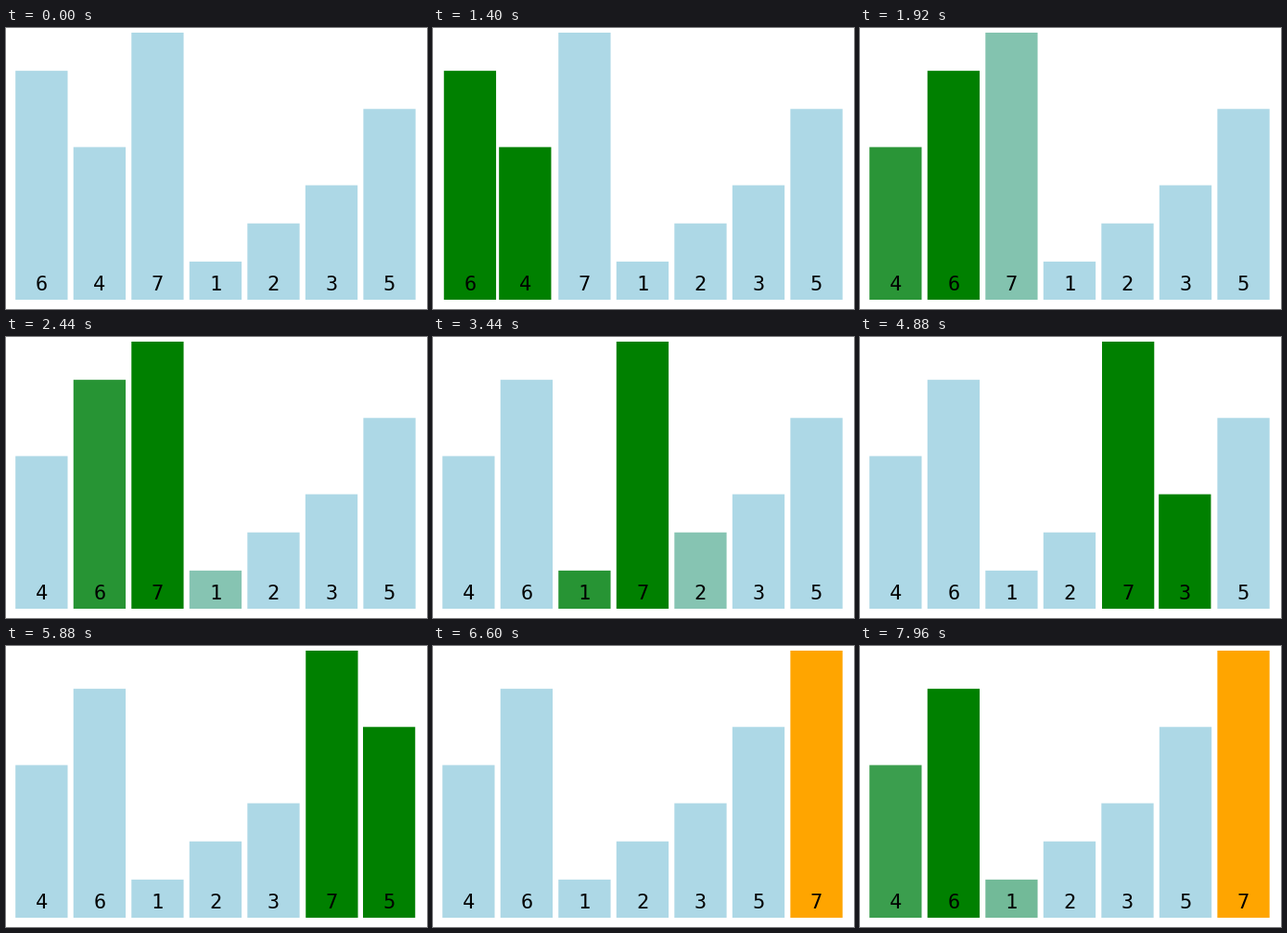
Write a matplotlib script that moves like this. It is 454 px wide and 303 px high and loops after 8000 ms.

```python
import matplotlib.pyplot as plt
from matplotlib.animation import FuncAnimation
from matplotlib.colors import to_rgb
from matplotlib.patches import Rectangle

W, H, DPI = 454, 303, 100
FRAME_MS, FRAMES = 40, 200
MOVE_MS = 250

LEFT, STEP, BAR_W = 10.2, 62.53, 56.28
FLOOR, UNIT = 293, 288 / 7
BASELINE, FONT_PX = 283, 22

IDLE, ACTIVE, DONE = map(to_rgb, ("lightblue", "green", "orange"))
START = [6, 4, 7, 1, 2, 3, 5]

# Bubble sort steps: (start in ms, values to recolour, values to swap)
STEPS = [
    (822, {6: ACTIVE, 4: ACTIVE}, ()),
    (1354, {}, (6, 4)),
    (1822, {4: IDLE, 7: ACTIVE}, ()),
    (2344, {6: IDLE, 1: ACTIVE}, ()),
    (2851, {}, (7, 1)),
    (3344, {1: IDLE, 2: ACTIVE}, ()),
    (3851, {}, (7, 2)),
    (4355, {2: IDLE, 3: ACTIVE}, ()),
    (4845, {}, (7, 3)),
    (5342, {3: IDLE, 5: ACTIVE}, ()),
    (5851, {}, (7, 5)),
    (6355, {5: IDLE, 7: DONE}, ()),
    (7340, {4: ACTIVE, 6: ACTIVE}, ()),
    (7850, {4: IDLE, 1: ACTIVE}, ()),
]


def cubic_in_out(t):
    t = min(max(t, 0), 1)
    return 4 * t**3 if t < 0.5 else 1 - 4 * (1 - t) ** 3


def mix(a, b, k):
    return tuple(p + (q - p) * k for p, q in zip(a, b))


def state_at(ms):
    """Slot and colour of every value at a given time."""
    slots = {v: i for i, v in enumerate(START)}
    colors = {v: IDLE for v in START}
    for start, recolor, swap in STEPS:
        if ms <= start:
            break
        k = cubic_in_out((ms - start) / MOVE_MS)
        for v, color in recolor.items():
            colors[v] = mix(colors[v], color, k)
        if swap:
            a, b = swap
            shift = (slots[b] - slots[a]) * k
            slots[a] += shift
            slots[b] -= shift
    return slots, colors


fig = plt.figure(figsize=(W / DPI, H / DPI), dpi=DPI, facecolor="white")
ax = fig.add_axes([0, 0, 1, 1])
ax.set(xlim=(0, W), ylim=(H, 0))
ax.axis("off")

bars, labels = {}, {}
for value in START:
    height = UNIT * value
    bars[value] = ax.add_patch(
        Rectangle((0, FLOOR - height), BAR_W, height, linewidth=0, snap=False))
    labels[value] = ax.text(
        0, BASELINE, str(value), ha="center", va="baseline", color="black",
        family="DejaVu Sans Mono", fontsize=FONT_PX * 72 / DPI, zorder=3)


def draw(frame):
    slots, colors = state_at(frame * FRAME_MS)
    for value, bar in bars.items():
        x = LEFT + STEP * slots[value]
        bar.set_x(x)
        bar.set_facecolor(colors[value])
        labels[value].set_x(x + BAR_W / 2)
    return [*bars.values(), *labels.values()]


anim = FuncAnimation(fig, draw, frames=FRAMES, interval=FRAME_MS,
                     repeat=True, repeat_delay=0, blit=False)
plt.show()
```
